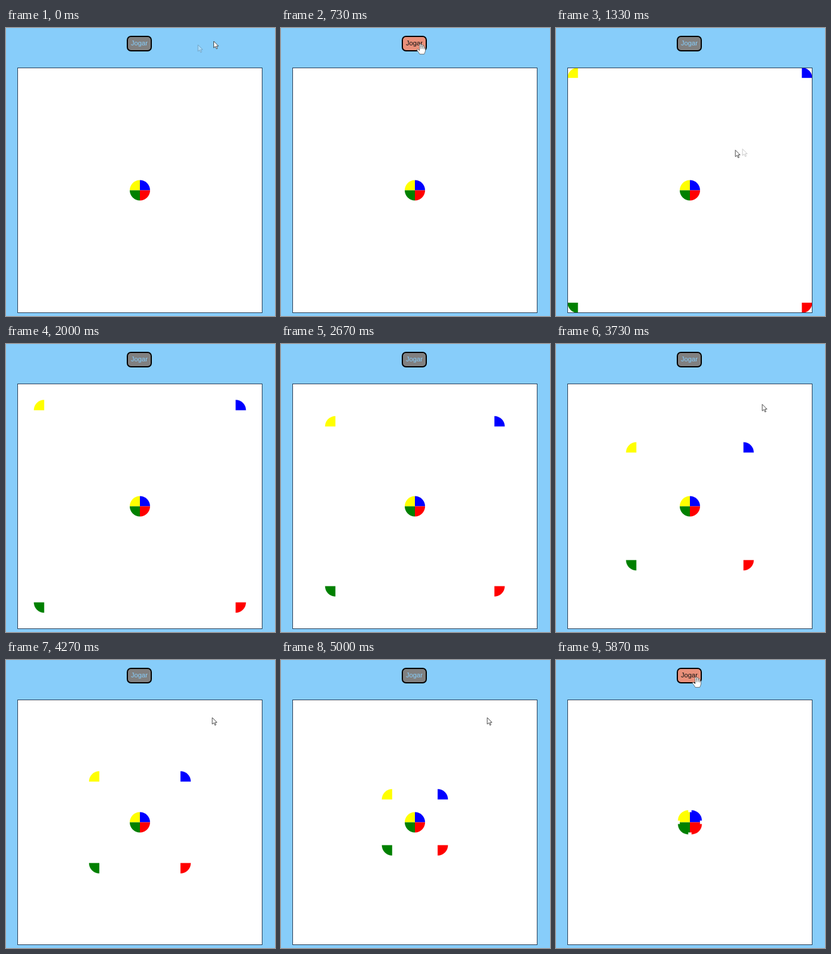
An HTML page that plays this animation: 450 by 480 pixels, repeating every 5940 ms.

```html
<!DOCTYPE html>
<html lang="pt">
<head>
<meta charset="utf-8">
<title>Jogar</title>
<style>
html, body { margin: 0; width: 100%; height: 100%; overflow: hidden; background: #87cdfa; }
svg { display: block; width: 450px; height: 480px; }
text { font: 11.2px "Liberation Sans", Arial, sans-serif; text-anchor: middle; }
</style>
</head>
<body>
<svg viewBox="0 0 450 480">
  <defs>
    <clipPath id="board"><rect x="20" y="67" width="408" height="407"/></clipPath>
    <path id="arrow" d="M0 0V11L2.7 8.7 4.6 12.8 6.3 12 4.5 8.1H8Z" fill="#fff" stroke="#333" stroke-width=".9" stroke-linejoin="round"/>
    <g id="hand" fill="#fff" stroke="#555" stroke-width=".8" stroke-linejoin="round">
      <path d="M-1.2 9V1.2Q0-.6 1.2 1.2V6L1.6 2.2Q3-.2 4 2V6.5L4.6 3.6Q6 2 6.6 4V7.5Q8.6 5.5 8.6 8V12Q7.8 15 6.4 17.6H-1Q-2.4 14.5-5.4 11.2-6.2 9-4.4 9.2L-1.2 11.6Z"/>
      <path d="M1.2 6V9M4 6.5V9M6.6 7.5V9.5" fill="none"/>
    </g>
  </defs>
  <rect width="450" height="480" fill="#87cdfa"/>
  <rect x="19.5" y="66.5" width="409" height="408" fill="#fff" stroke="#263c56"/>
  <g id="wheel"></g>
  <g clip-path="url(#board)"><g id="parts"></g></g>
  <rect id="btn" x="203" y="14" width="40" height="24" rx="6" stroke="#000" stroke-width="2"/>
  <text id="label" x="223" y="29.3">Jogar</text>
  <use id="ghost" opacity=".3"/>
  <use id="cursor"/>
</svg>
<script>
const LOOP = 5940, STEP = 1000 / 15, COUNT = 89;
const CX = 224, CY = 270.5, R = 17;
const CLICK = 920, MEET = 5938, SPEED = 0.0407;
const $ = id => document.getElementById(id);

// direction x, direction y, colour
const QUADS = [[-1, -1, "#ff0"], [1, -1, "#00f"], [-1, 1, "#008000"], [1, 1, "#f00"]];

// time, x, y of the pointer tip
const PATH = [
  [0, 347.5, 22], [67, 321, 28], [270, 246, 30], [600, 233, 26], [930, 233, 26],
  [1070, 262, 110], [1333, 300, 203.5], [1400, 312, 201.5], [1480, 425, 484],
  [2760, 430, 484], [3000, 370, 200], [3200, 345, 109.5], [4000, 345, 96],
  [5150, 345, 96], [5450, 255, 45], [5660, 234, 28], [5940, 234, 28]
];

function addQuad(parent, [sx, sy, fill], edge) {
  const p = document.createElementNS("http://www.w3.org/2000/svg", "path");
  p.setAttribute("d", `M0 0H${sx * R}A${R} ${R} 0 0 ${sx * sy < 0 ? 0 : 1} 0 ${sy * R}Z`);
  p.setAttribute("fill", fill);
  if (edge) {
    p.setAttribute("stroke", fill);
    p.setAttribute("stroke-opacity", ".3");
  }
  parent.append(p);
  return p;
}

function place(el, x, y) {
  el.setAttribute("transform", `translate(${x} ${y})`);
}

QUADS.forEach(q => place(addQuad($("wheel"), q, false), CX, CY));
const parts = QUADS.map(q => addQuad($("parts"), q, true));

function pointer(t) {
  const i = Math.max(1, PATH.findIndex(k => k[0] >= t));
  const [t0, x0, y0] = PATH[i - 1], [t1, x1, y1] = PATH[i];
  const u = (t - t0) / (t1 - t0);
  return [x0 + (x1 - x0) * u, y0 + (y1 - y0) * u];
}

const inButton = ([x, y]) => x > 202 && x < 244 && y > 13 && y < 39;

function drawPointer(el, pos) {
  el.setAttribute("href", inButton(pos) ? "#hand" : "#arrow");
  place(el, ...pos);
}

function draw(time) {
  const frame = Math.floor((time % LOOP + 4) / STEP) % COUNT;
  const t = frame * STEP;
  const d = (MEET - t) * SPEED;

  $("parts").style.display = t > CLICK ? "" : "none";
  QUADS.forEach(([sx, sy], i) => place(parts[i], CX + sx * d, CY + sy * d));

  const now = pointer(t), next = pointer(Math.min(t + STEP, LOOP));
  const moved = Math.hypot(next[0] - now[0], next[1] - now[1]);
  drawPointer($("cursor"), now);
  drawPointer($("ghost"), next);
  $("ghost").style.display = moved > 6 ? "" : "none";

  const hover = inButton(now);
  $("btn").setAttribute("fill", hover ? "#e9907a" : "#808080");
  $("label").setAttribute("fill", hover ? "#111" : "#87cdfa");
}

const start = performance.now();
function tick() {
  draw(performance.now() - start);
  requestAnimationFrame(tick);
}
tick();
</script>
</body>
</html>
```
